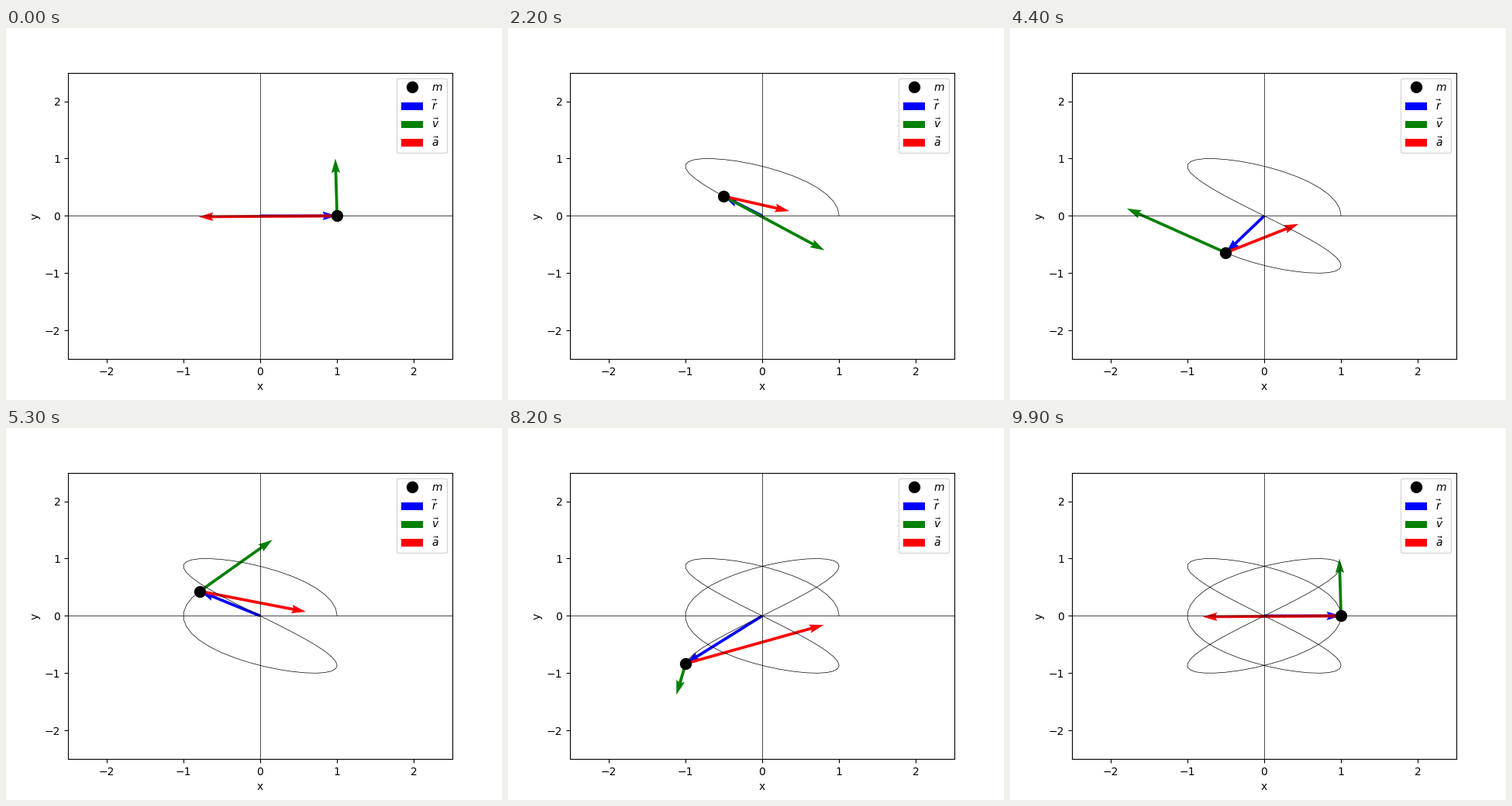
Write a matplotlib script that moves like this. It is 640 px wide and 480 px high and loops after 10000 ms.

```python
import numpy as np
import matplotlib.pyplot as plt
from matplotlib.animation import FuncAnimation

FRAMES = 100
H = 0.01  # step of the forward differences
V_SCALE, A_SCALE = 0.5, 0.2


def pos(t):
    return np.array([np.cos(3 * t), np.sin(2 * t)])


def vel(t):
    return (pos(t + H) - pos(t)) / H


def acc(t):
    return (vel(t + H) - vel(t)) / H


times = np.linspace(0, 2 * np.pi, FRAMES)
path = pos(times)

fig, ax = plt.subplots(figsize=(6.4, 4.8), dpi=100)
ax.set(xlim=(-2.5, 2.5), ylim=(-2.5, 2.5), xlabel="x", ylabel="y")
ax.axhline(0, color="black", lw=0.5)
ax.axvline(0, color="black", lw=0.5)
trail, = ax.plot([], [], color="black", lw=0.5)
mass, = ax.plot([1], [0], "o", color="black", ms=10, label="$m$")


def arrow(color, name):
    return ax.quiver([0], [0], [1], [0], color=color, angles="xy",
                     scale_units="xy", scale=1, label=rf"$\vec{{{name}}}$")


r_arrow = arrow("blue", "r")
v_arrow = arrow("green", "v")
a_arrow = arrow("red", "a")
ax.legend(loc="upper right")


def update(i):
    t, p = times[i], path[:, i]
    trail.set_data(*path[:, :i + 1])
    mass.set_data([p[0]], [p[1]])
    r_arrow.set_UVC(*p)
    for q, vec in ((v_arrow, V_SCALE * vel(t)), (a_arrow, A_SCALE * acc(t))):
        q.set_offsets([p])
        q.set_UVC(*vec)
    return trail, mass, r_arrow, v_arrow, a_arrow


anim = FuncAnimation(fig, update, frames=FRAMES, interval=100,
                     repeat=True, repeat_delay=0)
plt.show()
```
